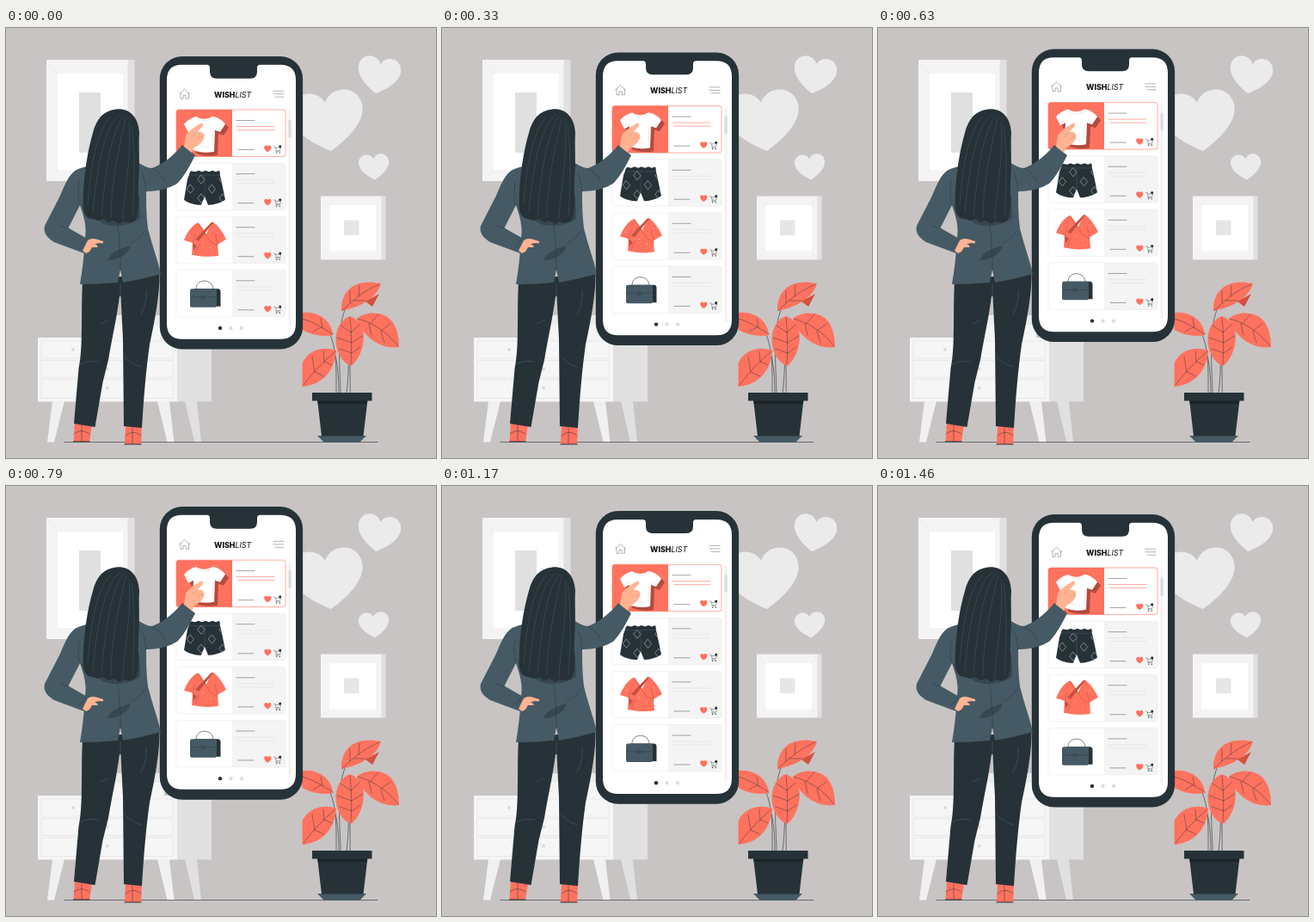
Animation, 500 px wide and 500 px high, one loop 1.5 s. Source, as an HTML page:

```html
<!DOCTYPE html>
<html lang="en">
<head>
<meta charset="utf-8">
<title>Wishlist</title>
<style>
html, body { margin: 0; width: 100%; height: 100%; overflow: hidden; background: #c8c4c3; }
svg { display: block; width: 100vw; height: 100vh; stroke-width: .6; }
text { font-family: Inter, "Open Sans", sans-serif; font-size: 8.9px; fill: #111; }
.line { fill: none; stroke: #263238; stroke-linecap: round; stroke-linejoin: round; }
.red { fill: #ff725e; }
.dark { fill: #263238; }
.slate { fill: #455a64; }
.skin { fill: #ffb391; }
</style>
</head>
<body>
<svg viewBox="0 0 500 500">
  <defs>
    <path id="heart" d="M0 0C-16-10-36-26-36-45C-36-57-28-66-17-66C-9-66-3-61 0-54C3-61 9-66 17-66C28-66 36-57 36-45C36-26 16-10 0 0Z"/>
    <path id="tee" d="M221 103C226 107 235 107 240 103C247 104 252 108 255 112L249 121L243 119L242 144C233 146 225 145 217 142L218 119L212 122L207 112C210 108 215 105 221 103Z"/>
    <clipPath id="right"><rect x="344.500" y="280" width="155" height="220"/></clipPath>
    <clipPath id="shortsClip"><path id="shorts" d="M214 168H248L250 176L255 200C249 204 241 206 235 206L231 196L227 206C220 206 212 204 207 200L211 176Z"/></clipPath>
  </defs>

  <rect width="500" height="500" fill="#c8c4c3"/>

  <!-- wall -->
  <g>
    <path fill="#e0e0e0" d="M141 37h8.500v141h-8.500z"/>
    <path fill="#f4f4f4" d="M47 37h94.500v141H47z"/>
    <path fill="#fff" d="M60 53h76v112H60z"/>
    <path fill="none" stroke="#e4e4e4" d="M47 37L60 53M47 178L60 165"/>
    <path fill="#e0e0e0" d="M85 75h25v70H85z"/>
    <path fill="#e0e0e0" d="M436 195.500h5.500v74H436z"/>
    <path fill="#f4f4f4" d="M366 195.500h70.500v74H366z"/>
    <path fill="#fff" d="M376 206h54v53.500h-54z"/>
    <path fill="none" stroke="#e4e4e4" d="M366 195.500L376 206M366 269L376 259.500M436 195.500L430 206M436 269L430 259.500"/>
    <path fill="#e6e6e6" d="M393 223.500h17.500v17.500H393z"/>
  </g>
  <g fill="#ebebeb">
    <use href="#heart" transform="translate(378 143) rotate(-7) scale(1.18 1.05)"/>
    <use href="#heart" transform="translate(430 76) rotate(9) scale(.69 .64)"/>
    <use href="#heart" transform="translate(429 176.500) rotate(-4) scale(.49 .45)"/>
  </g>

  <!-- cabinet -->
  <path fill="#ebebeb" d="M124 334h58v11h-58z"/>
  <path fill="#f5f5f5" d="M118 345h66v15h-66z"/>
  <g fill="#f0f0f0">
    <path d="M54 434h14l-12 47.500h-8zM176 434h14l5.500 47.500h-8z"/>
    <path fill="#e0e0e0" d="M208 434h14l5 47.500h-8z"/>
  </g>
  <path fill="#e0e0e0" d="M198 360h41v74.500h-41z"/>
  <path fill="#f5f5f5" d="M37 360h162v74.500H37z"/>
  <g fill="#f6f6f6" stroke="#e0e0e0">
    <path d="M41 364h153v20H41zM41 386.500h153v20H41zM41 409h153v21.500H41z"/>
  </g>
  <g fill="#dcdcdc"><circle cx="78" cy="374" r="2"/><circle cx="118" cy="396.500" r="2"/><circle cx="118" cy="418.500" r="2"/></g>
  <path class="line" d="M68 481.500H432"/>

  <!-- plant -->
  <g clip-path="url(#right)">
    <path class="line" d="M384 425C384 398 385 374 376 354M389 425C388 385 384 350 395 326M396 425C399 400 399 370 400 340M400 425C401 390 396 348 411 339M387 425C387 410 386 390 382 378"/>
    <g class="red">
      <path d="M390 329C389 307 404 290 436 297C432 312 415 324 390 329Z"/>
      <path d="M408 338C418 329 439 329 449 341C455 349 457 361 457 371C438 374 416 362 408 338Z"/>
      <path d="M380 357C379 342 365 329 345 331L335 345C350 356 366 360 380 357Z"/>
      <path d="M384 375C366 369 350 376 343 392L344 417C362 416 382 404 384 375Z"/>
      <path d="M400 335C382 342 380 366 388 381C392 388 397 391 401 393C412 385 418 366 415 352C412 342 407 338 400 335Z"/>
    </g>
    <path fill="#d4513f" d="M418 318L434 309L426 324Z"/>
    <path class="line" stroke-width=".45" d="M391 329C402 317 416 306 434 298M400 320L400 306M410 312L411 299M404 317L418 317M409 338C427 343 443 353 456 370M423 344L433 333M436 352L447 344M422 344L425 357M436 353L440 366M380 356C369 349 358 342 345 338M368 349L366 338M366 348L357 353M383 376C371 386 358 399 346 415M370 388L369 376M359 400L356 382M370 388L379 392M359 400L370 405M400 337C402 357 402 373 401 391M401 354L389 346M402 366L385 360M402 378L388 373M401 354L411 345M402 366L415 358M402 378L412 371"/>
  </g>
  <path class="slate" d="M362 474h57l-8 8h-41z"/>
  <path class="dark" d="M362 432h58.500l-5 42.500h-48.500zM356 424h69.500v9.500H356z"/>
  <path d="M362.200 433.500h58l-.4 3.500h-57.200z" fill="#1a2429"/>

  <!-- phone -->
  <g id="phone">
    <rect class="dark" x="178.800" y="33.200" width="166.300" height="340.600" rx="26"/>
    <path fill="#fff" d="M204 43H233C236 43 237 44 237 47V51Q237 59 245 59H284Q292 59 292 51V47C292 44 293 43 296 43H319Q337 43 337 61V344Q337 362 319 362H205Q187 362 187 344V61Q187 43 204 43Z"/>
    <path class="line" stroke-width=".45" style="stroke:#555" d="M201.500 77L207.500 71.500L213.500 77M203 76V82.500H206V78.500H209V82.500H212.500V76M311 73.500H323M311 77H323M313 80.500H323"/>
    <text x="242" y="81.200"><tspan font-weight="800">WISH</tspan><tspan font-style="italic">LIST</tspan></text>
    <rect x="328.500" y="96" width="3.200" height="251" rx="1.600" fill="#f3f3f3"/>
    <rect x="328.500" y="107" width="3.200" height="21" rx="1.600" fill="#d9dbe0"/>
    <g id="cards"></g>

    <use href="#tee" x="4" y="4" fill="#b34b3d"/>
    <use href="#tee" fill="#fff"/>
    <path class="line" stroke-width=".3" style="stroke:#bbb" d="M221 105C227 109 235 109 241 105M219 122L218 136M241 121L240 138M211 119L217 117M250 119L244 117M221 129L230 131M222 137L236 139"/>

    <use href="#shorts" class="dark"/>
    <path class="dark" d="M213 170L215 166.500L220 167.500L224 166L228 167.500L232 166L236 167.500L240 166L244 167.500L248 166L249 170Z"/>
    <g id="diamonds" clip-path="url(#shortsClip)" class="line" style="stroke:#cfd5d8"></g>
    <path class="line" style="stroke:#596a72" stroke-width=".4" d="M214 171.500H248M231 171.500V196"/>

    <path class="red" d="M222 227L229 228L236 227L241 226C247 230 252 238 256 246L246 252L247 265C237 267 225 266 216 264L217 250L207 247C210 239 215 231 222 227Z"/>
    <path fill="#fff" d="M224 226.500L233 240L239 226Z"/>
    <path fill="#c4503f" d="M239 226L241 226.500L224 248L220 246ZM217 250L222 254L218 259Z"/>
    <path class="line" style="stroke:#a64435" stroke-width=".4" d="M223 227L237 248L246 254M217 250L220 240M246 252L243 240M225 252L220 262"/>
    <g fill="#ffd0c7"><circle cx="214" cy="242" r=".6"/><circle cx="229" cy="250" r=".6"/><circle cx="238" cy="256" r=".6"/><circle cx="246" cy="238" r=".6"/></g>

    <path class="line" d="M221 304C220 291 241 291 241 304"/>
    <path class="dark" d="M219 303.500H247Q249.500 304 249.500 307V324H219Z"/>
    <rect class="slate" x="214" y="303.500" width="31" height="21.500" rx="2"/>
    <path class="line" stroke-width=".4" d="M214.500 313H244.500M228 311.500h3v3.500h-3z"/>
    <g fill="#ddd"><circle class="dark" cx="249" cy="349.300" r="2.200"/><circle cx="261.500" cy="349.300" r="2.200"/><circle cx="274" cy="349.300" r="2.200"/></g>
  </g>

  <!-- woman -->
  <g>
    <g class="red">
      <path d="M80 458L100 462L97 481H78.500Z"/>
      <path d="M139 462H158L157 484H138Z"/>
    </g>
    <path class="line" stroke-width=".5" d="M79 472C85 467 91 468 97 472M88 461V480M139 474C145 469 151 469 157 474M147 465V483"/>
    <path class="line" stroke-width="1" d="M78.500 481H97M138 484H157"/>
    <path class="dark" d="M89 294L178.500 284C179 310 173 340 167 368C163 396 160 430 158 465L137 463L136 362L133.500 312L132 312C129 336 123 362 119 386L112.500 412L103.500 464L79 460L84.500 396C90 372 87 330 89 294Z"/>
    <path class="line" style="stroke:#53656e" stroke-width=".5" d="M133 297V312M86 391C94 387 101 387 107 388M138 382C144 388 150 392 157 394M110 344L119 340M163 305C164 316 161 325 157 333"/>
    <path class="slate" d="M104 157C94 162 85 162 79 167C71 174 67 186 63 195L45 230C43 238 48 244 56 249L91 262L98 247L72.500 232.500L86 206C91 220 94 232 92 244C91 263 89 280 86 298C101 298 117 297 130 296L133 281L136 296C151 293 166 290 180 286C176 268 169 250 165 233C163 218 163 203 163 190C178 190 192 186 200 180C208 171 214 160 220 148L205 136C196 147 185 157 170 163C162 163 157 157 148 154Z"/>
    <path fill="#37474f" d="M91 209C104 214 105 226 118 229C132 232 149 228 156 221L155 195L98 195ZM118 270C122 261 131 257 145 253C142 263 132 270 118 270Z"/>
    <path class="line" stroke-width=".45" d="M86 206C83 196 84 186 85 179M163 190C162 181 161 175 158 169M133 281C133 260 132 246 130 230M161 236C157 244 151 248 145 250M73 233L63 230M170 163C179 169 183 174 184 178M86 254L93 245"/>
    <path class="skin" d="M89 259L95 247C101 243 106 246 113 248C114 250 112 251 109 250L103 251C107 253 108 255 105 255L100 255L97 260L93 262Z"/>
    <path class="skin" d="M207 138L209 125C213 119 220 115 226 111C229 110 230 113 228 115L222 121C227 120 231 122 230.500 127C229 132 224 137 219 139L216 145Z"/>
    <path class="line" style="stroke:#d98a6e" stroke-width=".45" d="M222 121L216 127M229 126L222 129"/>
    <path class="dark" d="M128 94.500C143 93 154 103 155 122C154 138 156 151 154 178C153 195 156 209 152 221C149 227 142 227 136 225L132 228L125 224L119 226L113 222L107 224L101 222C93 222 89 215 89.500 204C90 172 95 142 101 122C105 106 113 96 128 94.500Z"/>
    <path class="line" style="stroke:#455a64" stroke-width=".5" d="M132 101C118 112 107 145 101 215M136 103C121 125 116 165 111 217M139 105C132 138 122 178 122 220M143 109C147 147 137 190 136 222M146 113C151 148 149 190 147 219M121 104C107 119 99 153 95 205"/>
  </g>
</svg>
<script>
const $ = id => document.getElementById(id);
const PERIOD = 1500, LIFT = 10, LEAD = 21;

// one list row: thumbnail, text strokes, heart and cart
function card(i) {
  const y = 95.3 + i * 62.1, on = i === 0;
  const edge = on ? '#ff725e' : '#e9e9e9';
  const body = on ? '#ff725e' : '#f4f4f4';
  const soft = on ? '#ff725e' : '#dedede';
  const rule = (x1, x2, dy, color) =>
    `<path class="line" style="stroke:${color}" d="M${x1} ${y + dy}H${x2}"/>`;
  const half = on
    ? `M263 ${y}h-62q-3 0-3 3v48.500q0 3 3 3h62z`
    : `M263 ${y}h59q3 0 3 3v48.500q0 3-3 3h-59z`;
  return `<rect x="198" y="${y}" width="127" height="54.500" rx="3" fill="#fff"/>
    <path d="${half}" fill="${body}"/>
    <rect x="198" y="${y}" width="127" height="54.500" rx="3" fill="none" stroke="${edge}"/>
    ${rule(268, 289, 12.5, '#666')}${rule(268, 312, 19.5, soft)}${rule(270, 312, 23.5, soft)}
    ${rule(270, 288, 46.5, '#666')}
    <use href="#heart" class="red" transform="translate(304.300 ${y + 49.2}) scale(.115)"/>
    <g transform="translate(311.500 ${y + 42}) scale(.9)">
      <path class="line" stroke-width=".45" d="M0 1h1.500l1.500 5h5l1-3.500h-6.700M3 6l-.4 1.500h5.500"/>
      <circle class="dark" cx="3.500" cy="9" r=".7"/><circle class="dark" cx="7.500" cy="9" r=".7"/>
      <circle class="dark" cx="8" cy=".8" r="1.700"/>
    </g>`;
}

function diamonds() {
  let d = '';
  for (let r = 0; r < 3; r++)
    for (let c = 0; c < 3; c++) {
      const x = 227 + (c - 1) * 25 + (r % 2) * 12.5, y = 182 + (r - .5) * 11;
      d += `M${x} ${y - 5}l4 5l-4 5l-4-5z`;
    }
  return `<path stroke-width=".5" d="${d}"/>`;
}

$('cards').innerHTML = [0, 1, 2, 3].map(card).join('');
$('diamonds').innerHTML = diamonds();

// steady rise and fall
function draw(ms) {
  const p = ((ms + LEAD) % PERIOD) / PERIOD;
  const lift = LIFT * (1 - Math.abs(1 - 2 * p));
  $('phone').setAttribute('transform', `translate(0 ${-lift.toFixed(3)})`);
}

const start = performance.now();
function tick() {
  draw(performance.now() - start);
  requestAnimationFrame(tick);
}
draw(0);
requestAnimationFrame(tick);
</script>
</body>
</html>
```
